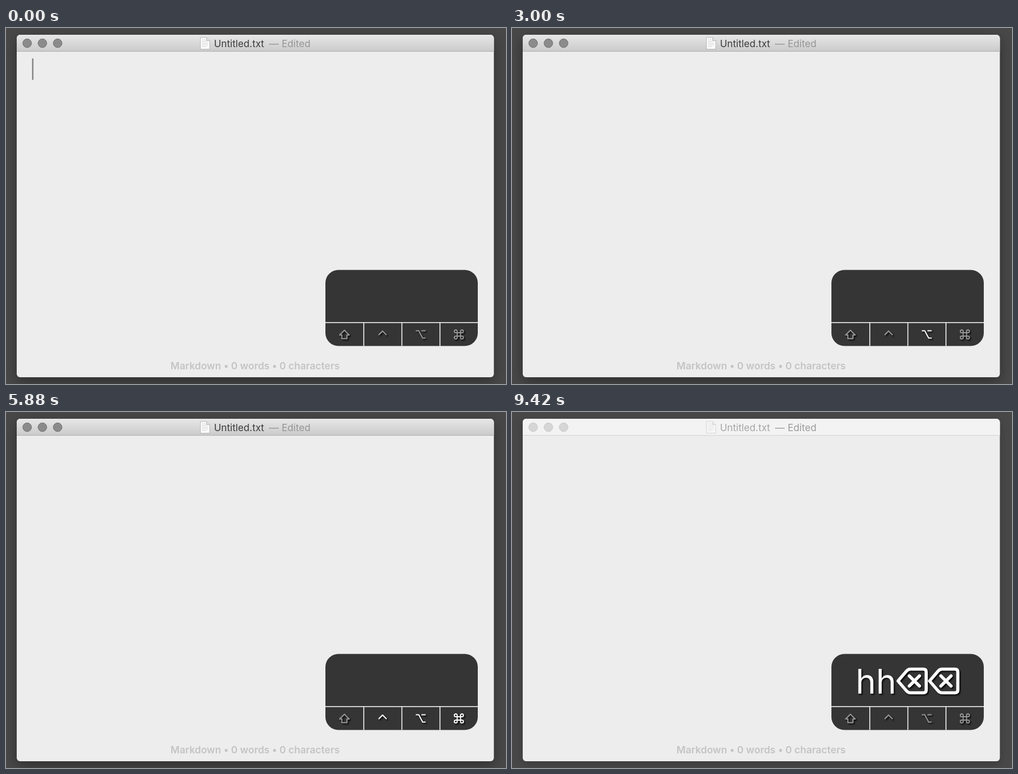
Write an HTML page that moves like this. It is 886x632 px and loops after 9480 ms.

```html
<!DOCTYPE html>
<html lang="en">
<head>
<meta charset="utf-8">
<title>Input methods</title>
<style>
html, body { margin: 0; width: 100%; height: 100%; overflow: hidden; background: #484848; }
svg { display: block; width: 886px; height: 632px; font-family: Inter, "Noto Sans CJK JP", "Noto Sans CJK SC", sans-serif; }
text { white-space: pre; }
#win { filter: drop-shadow(0 7px 11px rgba(0,0,0,.36)); }
.light { fill: #8b8b8b; stroke: #6f6f6f; }
#bar { fill: url(#grad); }
#edge { fill: #afafaf; }
#name { fill: #3c3c3c; }
#edited { fill: #969696; }
.idle #win { filter: drop-shadow(0 5px 8px rgba(0,0,0,.2)); }
.idle .light { fill: #d6d6d6; stroke: #c8c8c8; }
.idle #bar { fill: #f3f3f3; }
.idle #edge { fill: #d2d2d2; }
.idle #name { fill: #a6a6a6; }
.idle #edited { fill: #9b9b9b; }
.idle #icon { opacity: .55; }
#count { font-size: 17.5px; font-weight: 600; fill: #c4c4c4; text-anchor: middle; }
#typed { font-size: 22.5px; fill: #2b2b2b; }
.popup { filter: drop-shadow(0 5px 8px rgba(0,0,0,.3)); }
.line { fill: none; stroke-linecap: round; stroke-linejoin: round; }
#mods, #keys { filter: drop-shadow(2px 2.5px 1px rgba(0,0,0,.85)); }
#mods path { stroke: #979797; stroke-width: 2; }
#mods path.lit { stroke: #fff; }
#keys { font-size: 61px; fill: #fff; }
#keys path { stroke: #fff; }
</style>
</head>
<body>
<svg id="stage" viewBox="0 0 886 632">
  <defs>
    <linearGradient id="grad" x2="0" y2="1">
      <stop stop-color="#e7e7e7"/><stop offset="1" stop-color="#cbcbcb"/>
    </linearGradient>
  </defs>

  <rect id="win" x="19" y="12" width="845.5" height="608" rx="6" fill="#ededed"/>
  <path id="bar" d="M19 41V18a6 6 0 0 1 6-6H858.500a6 6 0 0 1 6 6V41z"/>
  <rect id="edge" x="19" y="41" width="845.5" height="1"/>
  <g id="lights"></g>
  <g id="icon">
    <path d="M344.500 17H355.500L361 22.500V37.500H344.500z" fill="#fcfcfc" stroke="#aaa" stroke-width=".8"/>
    <path d="M355.500 17V22.500H361" fill="#ddd" stroke="#aaa" stroke-width=".8"/>
    <path d="M347 21h7M347 24h9M347 27h11M347 30h11M347 33h8" stroke="#d2d2d2"/>
  </g>
  <g font-size="17.2">
    <text id="name" x="368.500" y="33.800">Untitled.txt</text>
    <text id="edited" y="33.800"><tspan x="466">—</tspan><tspan x="488.500">Edited</tspan></text>
  </g>
  <text id="count" x="441.500" y="606.300"></text>

  <text id="typed" x="45.500"></text>
  <rect id="under" x="46" fill="#6c6c6c"/>
  <rect id="caret" y="54" width="2.700" fill="#8c8c8c"/>

  <g id="kana" class="popup">
    <rect x="37.500" y="103.500" width="225" height="213" rx="5.500" fill="#fff" stroke="#b8b8b8"/>
    <g font-size="21" font-weight="700">
      <text x="47" y="129.500">っは</text>
      <text x="47" y="166.500">っ</text>
      <text x="47" y="202.500">っふ</text>
    </g>
    <circle cx="246" cy="159" r="7.300" fill="none" stroke="#555" stroke-width="1.200"/>
    <text x="246" y="164" font-size="14" font-weight="700" fill="#444" text-anchor="middle" style="font-family:'Noto Serif',serif">i</text>
    <rect id="thumb" x="250" y="215" width="9" height="69" rx="4.500" fill="#757575"/>
    <text x="77" y="306" font-size="13" letter-spacing=".25" fill="#757575">Space or Tab to select</text>
    <text x="236.500" y="306" font-size="18">»</text>
  </g>

  <g id="hanzi" class="popup">
    <rect x="45.500" y="98.500" width="90" height="255.500" rx="12" fill="#282828" stroke="#181818"/>
    <path d="M46 148V110.500a11.500 11.500 0 0 1 11.500-11.500H123.500a11.500 11.500 0 0 1 11.500 11.500V148z" fill="#5c5c5c"/>
    <g id="rows" font-size="26.500"></g>
  </g>

  <rect x="566" y="429.500" width="270" height="135" rx="23" fill="#353535"/>
  <path d="M566 523H836M634 523V564.500M701.500 523V564.500M769 523V564.500" stroke="#fff" stroke-width="1.500"/>
  <g id="mods"></g>
  <g id="keys"></g>
</svg>

<script>
const LOOP = 9480;
const $ = id => document.getElementById(id);

// Key symbols centred on 0,0; the modifiers are in panel order
const signs = {
  '⇧': 'M0-7.500L8.500 1H4.500V7.500H-4.500V1H-8.500z',
  '⌃': 'M-6.500 .5L0-6L6.500 .5',
  '⌥': 'M-8-6.500H-3.500L3.500 6.500H8M2-6.500H8',
  '⌘': 'M-3-3V-5.500a2.500 2.500 0 1 0-2.500 2.500H5.500a2.500 2.500 0 1 0-2.500-2.500V5.500a2.500 2.500 0 1 0 2.500-2.500H-5.500a2.500 2.500 0 1 0 2.500 2.500z',
  '⌫': 'M-25 0L-10-17.500Q-7-21-3-21H20Q25-21 25-16V16Q25 21 20 21H-3Q-7 21-10 17.500zM-5-9L13 9M13-9L-5 9'
};
const widths = { h: 36, '⌃': 42, '⌥': 56, '⌘': 58, '⌫': 56 };

// Each entry changes only the named parts of the state
const steps = [
  [0, { caret: 1, text: '', keys: '', mods: '', pop: '', ime: '', idle: 0 }],
  [120, { caret: 0 }],
  [420, { mods: '⌥' }], [480, { mods: '⌃⌥' }], [540, { mods: '⌃⌥⌘' }],
  [600, { caret: 1 }],
  [780, { keys: '⌃⌥⌘J' }],
  [960, { mods: '⌃⌥', keys: '' }], [1020, { mods: '⌥' }],
  [1080, { caret: 0 }], [1140, { mods: '' }],
  [1620, { keys: 'h', caret: 1 }], [1680, { text: 'h', ime: 'kana' }],
  [1740, { keys: 'hh' }], [1800, { text: 'っh' }],
  [1860, { pop: 'kana' }], [1920, { pop: 'kana+' }],
  [2280, { keys: 'hh⌫', text: 'っ', pop: '' }],
  [2400, { keys: 'hh⌫⌫', text: '', ime: '' }],
  [2880, { caret: 0 }],
  [3000, { mods: '⌥', keys: '' }], [3060, { mods: '⌃⌥' }], [3180, { mods: '⌃⌥⌘' }],
  [3420, { caret: 1 }], [3540, { keys: '⌃⌥⌘C' }],
  [3900, { caret: 0 }], [3960, { mods: '⌥', keys: '' }], [4020, { mods: '' }],
  [4380, { caret: 1 }], [4440, { keys: 'h', text: 'h', ime: 'hanzi' }],
  [4500, { keys: 'hh', text: 'hh' }], [4560, { pop: 'hanzi' }],
  [4980, { caret: 0 }],
  [5040, { keys: 'hh⌫' }], [5100, { text: 'h', pop: '', caret: 1 }],
  [5220, { keys: 'hh⌫⌫' }], [5280, { text: '', ime: '' }],
  [5580, { mods: '⌥', keys: '' }], [5760, { caret: 0 }],
  [5820, { mods: '⌃⌥' }], [5880, { mods: '⌃⌥⌘' }], [5940, { keys: '⌃⌥⌘E' }],
  [6240, { caret: 1 }], [6360, { mods: '', keys: '' }],
  [6720, { caret: 0 }],
  [7260, { caret: 1, keys: 'h', text: 'h' }], [7320, { keys: 'hh' }], [7380, { text: 'hh' }],
  [7920, { keys: 'hh⌫', text: 'h' }], [7980, { keys: 'hh⌫⌫' }], [8040, { text: '' }],
  [8520, { caret: 0 }], [9000, { caret: 1 }],
  [9420, { caret: 0, idle: 1 }]
];

const show = (id, on) => $(id).setAttribute('visibility', on ? 'visible' : 'hidden');
const set = (id, attrs) => {
  for (const k in attrs) $(id).setAttribute(k, attrs[k]);
};

$('lights').innerHTML = [37.5, 64.5, 91.5]
  .map(x => `<circle class="light" cx="${x}" cy="27" r="7.700"/>`).join('');
$('rows').innerHTML = [...'行航杭夯桁酐'].map((c, i) => {
  const y = 137.5 + i * 39.2;
  return `<text x="59.500" y="${y}" fill="#c8c8c8" style="font-family:'DejaVu Sans',sans-serif">${i + 1}.</text>` +
    `<text x="93" y="${y}" fill="#dedede" style="font-family:'Noto Sans CJK SC',sans-serif">${c}</text>`;
}).join('');
$('mods').innerHTML = [...'⇧⌃⌥⌘'].map((c, i) =>
  `<path class="line" d="${signs[c]}" transform="translate(${599.7 + i * 67.6} 544)"/>`).join('');

function keyRow(keys) {
  const list = [...keys], wide = c => widths[c] || 42;
  let x = 701 - list.reduce((sum, c) => sum + wide(c), 0) / 2;
  return list.map(c => {
    const w = wide(c), left = x, scale = c === '⌫' ? 1 : 3;
    x += w;
    return signs[c]
      ? `<path class="line" d="${signs[c]}" stroke-width="${5.6 / scale}" transform="translate(${left + w / 2} 477.500) scale(${scale})"/>`
      : `<text x="${left}" y="500">${c}</text>`;
  }).join('');
}

function draw(s) {
  const n = s.text.length, kana = s.text.includes('っ');
  const words = kana ? n : Math.min(n, 1);
  const plural = (k, word) => `${k} ${word}${k === 1 ? '' : 's'}`;
  $('count').textContent = `Markdown • ${plural(words, 'word')} • ${plural(n, 'character')}`;

  $('typed').textContent = s.text;
  set('typed', { y: kana ? 84 : 79 });
  const w = n ? $('typed').getComputedTextLength() : 0;
  set('under', { y: kana ? 95 : 88.3, width: Math.max(0, w - .5), height: s.ime === 'kana' ? 1.5 : 2.4 });
  show('under', s.ime && n);
  set('caret', { x: 46 + w + (n ? .6 : 0), height: kana ? 46 : 38 });
  show('caret', s.caret);

  show('kana', s.pop.startsWith('kana'));
  show('thumb', s.pop === 'kana+');
  show('hanzi', s.pop === 'hanzi');

  [...$('mods').children].forEach((p, i) => p.classList.toggle('lit', s.mods.includes('⇧⌃⌥⌘'[i])));
  $('keys').innerHTML = keyRow(s.keys);
  $('stage').classList.toggle('idle', !!s.idle);
}

let last = -1;
function tick() {
  const t = performance.now() % LOOP;
  const past = steps.filter(([at]) => at <= t);
  if (past.length !== last) {
    last = past.length;
    draw(Object.assign({}, ...past.map(p => p[1])));
  }
  requestAnimationFrame(tick);
}
tick();
</script>
</body>
</html>
```
